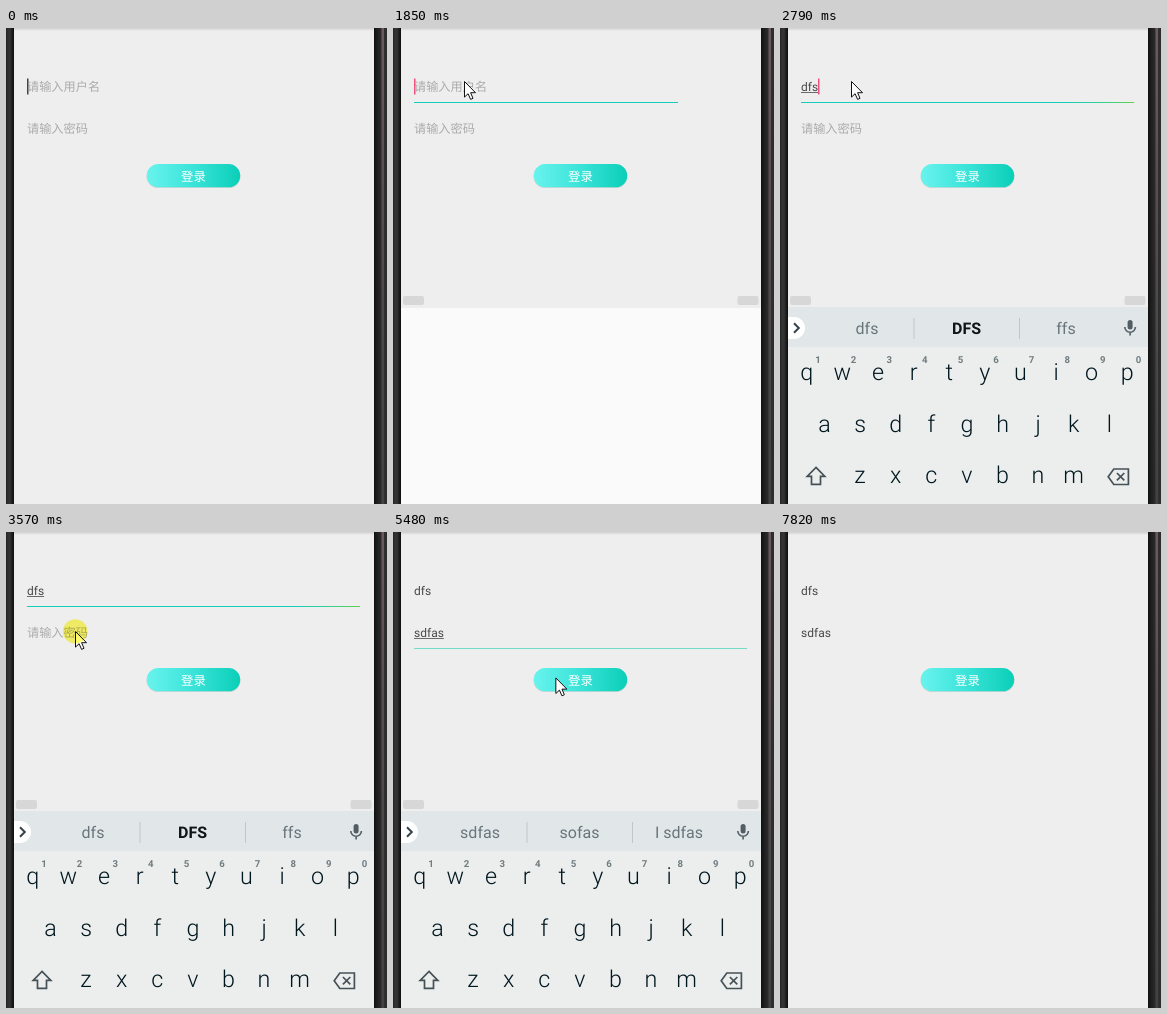
Recreate the animation shown at these times as an HTML page with a canvas. Size 381 by 476 pixels, loop 8000 ms.

```html
<!DOCTYPE html>
<html lang="zh-CN">
<head>
<meta charset="utf-8">
<title>登录</title>
<style>
html, body { margin: 0; width: 100%; height: 100%; overflow: hidden; background: #eee; }
canvas { display: block; }
</style>
</head>
<body>
<canvas id="stage" width="381" height="476"></canvas>
<script>
const ctx = document.getElementById('stage').getContext('2d');
const LOOP = 8000;
const BLINK = 500;
const SWITCH = 3640;  // focus moves to the password
const LEAVE = 7210;   // keyboard starts to close
const LATIN = 'Roboto, sans-serif';
const CJK = '"Noto Sans CJK SC", "Noto Sans CJK", sans-serif';

const NAME = { word: 'dfs', start: 2390, pace: 200 };
const PASS = { word: 'sdfas', start: 4490, pace: 115 };
const POINTER = [
  [440, 137, 354], [680, 72, 66], [760, 66, 43], [910, 66, 43], [1000, 71, 53],
  [3040, 71, 53], [3400, 69, 99], [5100, 69, 99],
  [5480, 162, 145], [5810, 279, 285], [5970, 258, 386], [6030, 168, 452]
];

const clamp = v => Math.max(0, Math.min(1, v));
const ramp = (t, a, b) => clamp((t - a) / (b - a));
const easeOut = p => 1 - (1 - p) ** 2;
const within = (t, a, b) => t >= a && t < b;

const keysHit = (t, { word, start, pace }) =>
  Math.max(0, Math.min(word.length, Math.floor((t - start) / pace) + 1));
const typed = (t, entry) => entry.word.slice(0, keysHit(t, entry));

function rect(x, y, w, h, color) {
  ctx.fillStyle = color;
  ctx.fillRect(x, y, w, h);
}

function text(str, x, y, font, color, align = 'left') {
  ctx.font = font;
  ctx.textRendering = 'geometricPrecision';
  ctx.fillStyle = color;
  ctx.textAlign = align;
  ctx.fillText(str, x, y);
}

function pill(x, y, w, h, r, fill) {
  ctx.beginPath();
  ctx.roundRect(x, y, w, h, r);
  ctx.fillStyle = fill;
  ctx.fill();
}

function stroke(path, color, width) {
  ctx.strokeStyle = color;
  ctx.lineWidth = width;
  ctx.stroke(new Path2D(path));
}

function gradient(x0, y0, x1, y1, ...stops) {
  const g = ctx.createLinearGradient(x0, y0, x1, y1);
  stops.forEach((c, i) => g.addColorStop(i / (stops.length - 1), c));
  return g;
}

function bezel() {
  rect(0, 0, 8, 476, gradient(0, 0, 8, 0, '#242425', '#323233', '#343435', '#1d1d1e', '#0d0d0e'));
  rect(368, 0, 13, 476, gradient(368, 0, 381, 0, '#111', '#1e1e1e', '#292929', '#303030', '#2c2c2c'));
  rect(375.5, 0, 2.5, 476, gradient(0, 0, 0, 476, '#6b5b60', '#5a4d51', '#4a4846', '#444240'));
}

function field(y, hint, value, composing) {
  if (!value) return text(hint, 21, y, '12.2px ' + CJK, '#ababab');
  text(value, 21, y, '12px ' + LATIN, '#484848');
  if (composing) rect(21, y + 1, ctx.measureText(value).width, 1, '#6a6a6a');
}

// Blinks from the last key press or focus change
function caret(t) {
  if (t > LEAVE + 200) return;
  const second = t >= SWITCH;
  const entry = second ? PASS : NAME;
  const count = keysHit(t, entry);
  const idle = second ? SWITCH : BLINK * .42 - BLINK;
  const since = t - (count ? entry.start + (count - 1) * entry.pace : idle);
  if (since % (2 * BLINK) >= BLINK) return;
  ctx.font = '12px ' + LATIN;
  const x = Math.round(21 + ctx.measureText(typed(t, entry)).width);
  rect(x, second ? 92.5 : 50.5, 1.5, 16, t < 1620 ? '#444' : '#f0507f');
}

function focusLines(t) {
  ctx.globalAlpha = 1 - ramp(t, SWITCH, SWITCH + 333);
  rect(21, 74, 333 * ramp(t, 1587, 1920), 1, gradient(284, 0, 354, 0, '#14cdbb', '#2fd09a', '#62d04a'));
  ctx.globalAlpha = 1 - ramp(t, LEAVE, LEAVE + 333);
  rect(21, 116, 333 * ramp(t, SWITCH, SWITCH + 333), 1, '#72dcc6');
  ctx.globalAlpha = 1;
}

function button() {
  pill(140.5, 137, 94, 23, 12, '#d2d6d6');
  pill(140.7, 136, 93.5, 23.3, 12, gradient(141, 0, 234, 0, '#68f3ee', '#3ae3d8', '#0bcfb8'));
  text('登录', 187.5, 153, '500 12.4px ' + CJK, '#fff', 'center');
}

function suggestions(t) {
  const name = typed(t, NAME), pass = typed(t, PASS), n = pass.length;
  if (n) return [pass, 'sofas'.slice(0, n), 'I ' + pass];
  if (name && t < SWITCH) return [name, name.toUpperCase(), 'ffs'.slice(0, name.length)];
  return ['thanks', 'I', 'we'];
}

function keyRow(keys, x, y, font = '300 23.3px ', color = '#00161f') {
  [...keys].forEach((k, i) => text(k, x + i * 35.6, y, font + LATIN, color, 'center'));
}

function icons() {
  ctx.lineJoin = 'miter';
  pill(8, 289, 17, 22, [0, 11, 11, 0], '#fff');
  stroke('M14 295.2L18.8 300L14 304.8', '#37434a', 2);
  pill(347.6, 292, 5, 9.6, 2.5, '#525e64');
  stroke('M344.8 299a5.3 5.3 0 0 0 10.6 0M350.1 304.3v3.2', '#525e64', 1.6);
  stroke('M36 439.4L44.8 448.4H40.5V456.4H31.5V448.4H27.2Z', '#465157', 1.7);
  stroke('M333.8 441H348.4V456.5H333.8L328.2 448.8ZM336.9 445l7.4 7.4M344.3 445l-7.4 7.4', '#465157', 1.7);
}

function keyboard(t) {
  rect(8, 279, 360, 197, '#ebeeed');
  rect(8, 279, 360, 40, '#e1e6e9');
  rect(133.5, 290, 1, 21, '#bfc7cb');
  rect(239, 290, 1, 21, '#bfc7cb');
  suggestions(t).forEach((word, i) => {
    const bold = word === NAME.word.toUpperCase();
    text(word, 87 + i * 99.5, 306, (bold ? 'bold ' : '') + '16px ' + LATIN, bold ? '#101416' : '#69757b', 'center');
  });
  keyRow('qwertyuiop', 26.8, 352);
  keyRow('asdfghjkl', 44.6, 403.5);
  keyRow('zxcvbnm', 80, 455);
  keyRow('1234567890', 38, 335, 'bold 9.6px ', '#707b80');
  icons();
}

function inputPanel(t) {
  if (!within(t, 1770, 7670)) return;
  const show = easeOut(ramp(t, 1900, 2090));
  const hide = ramp(t, LEAVE, 7600);
  if (t < 2090) rect(8, 280, 360, 196, '#fafafa');
  ctx.save();
  ctx.globalAlpha = show * (1 - hide);
  ctx.beginPath();
  ctx.rect(8, 279, 360, 197);
  ctx.clip();
  ctx.translate(0, 40 * (1 - show + hide * hide));
  if (ctx.globalAlpha > 0) keyboard(t);
  ctx.restore();
  ctx.globalAlpha = 1 - hide;
  pill(10, 268, 21, 9, 2, '#d7d7d7');
  pill(344.5, 268, 21, 9, 2, '#d7d7d7');
  ctx.globalAlpha = 1;
}

function pointer(t) {
  if (!within(t, 440, 6120)) return;
  const i = POINTER.findLastIndex(p => p[0] <= t);
  const from = POINTER[i], to = POINTER[i + 1] || from;
  const p = to === from ? 0 : ramp(t, from[0], to[0]);
  const x = from[1] + (to[1] - from[1]) * p;
  const y = from[2] + (to[2] - from[2]) * p;
  ctx.save();
  ctx.translate(x + .5, y + .5);
  ctx.lineJoin = 'miter';
  const arrow = 'M0 0V15.6L3.6 12.2L6.1 17.9L8.5 16.8L6.1 11.2H11Z';
  ctx.fillStyle = '#fff';
  ctx.fill(new Path2D(arrow));
  stroke(arrow, '#111', 1);
  // Click highlight tints whatever lies below
  if (within(t, 1380, 1600) || within(t, 3570, 3790)) {
    ctx.globalCompositeOperation = 'multiply';
    pill(-12.5, -12.3, 24.4, 24.4, 12.2, '#fffb6c');
  }
  ctx.restore();
}

function draw(t) {
  rect(0, 0, 381, 476, '#eee');
  rect(8, 0, 360, 3, gradient(0, 0, 0, 3, '#d0d0d0', '#eee'));
  field(63, '请输入用户名', typed(t, NAME), t < SWITCH);
  field(105, '请输入密码', typed(t, PASS), t < LEAVE);
  focusLines(t);
  caret(t);
  button();
  inputPanel(t);
  bezel();
  pointer(t);
}

function loop() {
  draw(performance.now() % LOOP);
  requestAnimationFrame(loop);
}
loop();
</script>
</body>
</html>
```
